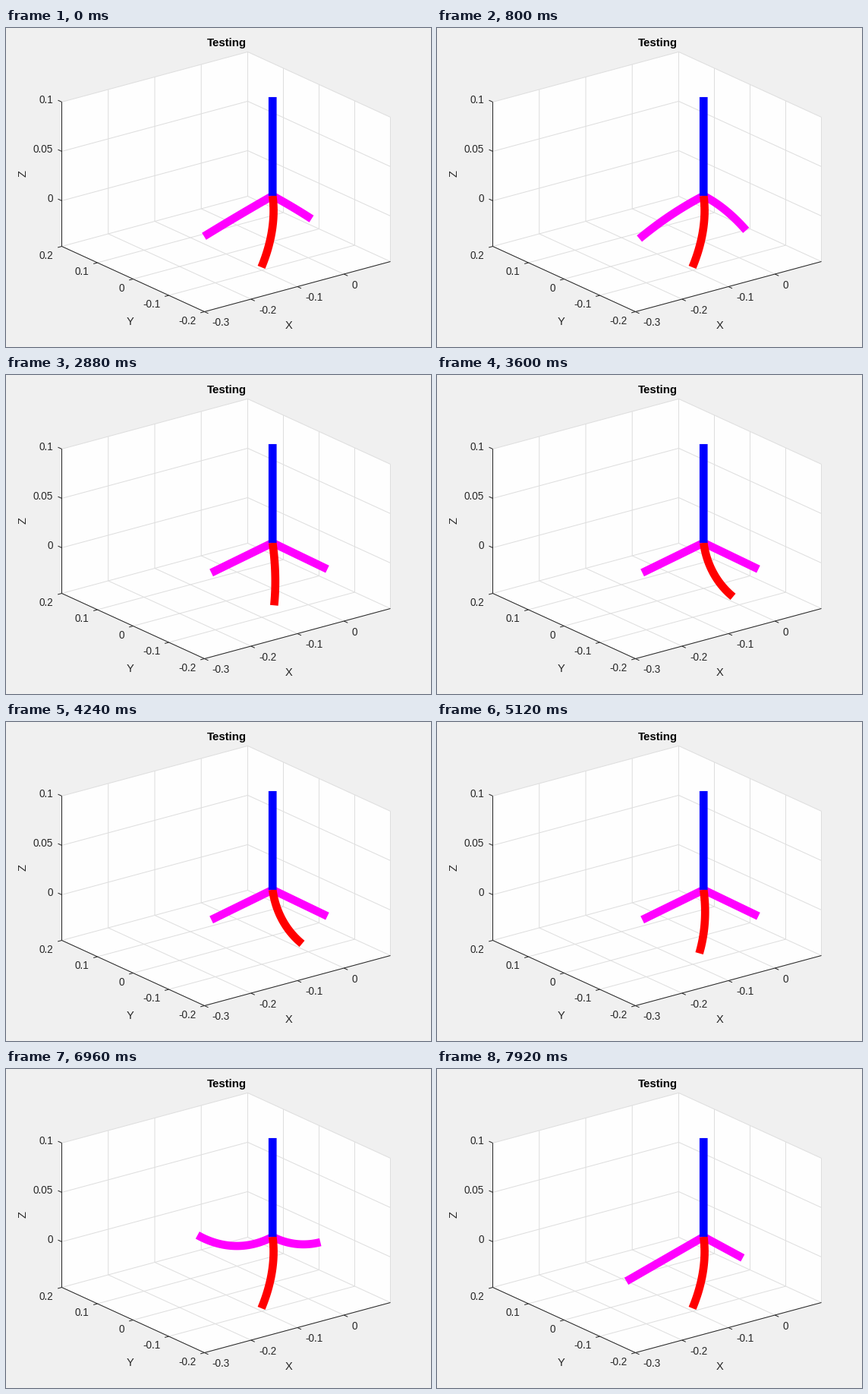
Recreate the animation shown at these times as a matplotlib script. Size 560 by 420 pixels, loop 8000 ms.

```python
import numpy as np
import matplotlib.pyplot as plt
from matplotlib.animation import FuncAnimation

W, H, DPI = 560, 420, 100
PT = 72 / DPI                      # points per pixel
FRAMES, STEP_MS = 100, 80
HALF = 20                          # steps in a stroke, and in a recovery
ARM_START, LOWER_START = 79, 29
INK, GRID = "#262626", "#dedede"
LIMB_PX, LIMB_LEN = 10.67, 0.125

plt.rcParams["font.family"] = "Liberation Sans"
fig = plt.figure(figsize=(W / DPI, H / DPI), dpi=DPI, facecolor="#f0f0f0")
ax = fig.add_axes([0, 0, 1, 1])
ax.set(xlim=(-0.5, W - 0.5), ylim=(H - 0.5, -0.5))
ax.axis("off")

# Orthographic box
X0, X1, Y0, Y1, Z0, Z1 = -0.3, 0.1, -0.2, 0.2, -0.0462, 0.1
XS = np.linspace(X0, X1, 5)
YS = np.linspace(Y0, Y1, 5)
ZS = [0, 0.05, 0.1]


def project(x, y, z):
    px = 261 + 612.5 * (x - X0) - 470 * (y - Y0)
    py = 373 - 165 * (x - X0) - 215 * (y - Y0) - 1300 * (z - Z0)
    return np.array([px, py])


def line(points, color, width=1.0, **kw):
    x, y = np.transpose(points)
    return ax.plot(x, y, color=color, lw=width * PT,
                   solid_capstyle="butt", **kw)[0]


def edge(*points, color=GRID):
    line([project(*p) for p in points], color)


def text(x, y, s, size=13.5, **kw):
    kw = {"color": INK, "va": "baseline", **kw}
    ax.text(x - 0.8, y - 0.8, s, fontsize=size * PT, **kw)


def tick(p, direction):
    d = np.array(direction) / np.hypot(*direction)
    line([p, p + 5.5 * d], INK)


def draw_axes():
    outline = [(X0, Y1, Z1), (X1, Y1, Z1), (X1, Y0, Z1),
               (X1, Y0, Z0), (X0, Y0, Z0), (X0, Y1, Z0)]
    ax.fill(*np.transpose([project(*p) for p in outline]),
            color="#fefefe", lw=0)

    for x in XS:
        edge((x, Y0, Z0), (x, Y1, Z0), (x, Y1, Z1))
    for y in YS:
        edge((X0, y, Z0), (X1, y, Z0), (X1, y, Z1))
    for z in ZS:
        edge((X0, Y1, z), (X1, Y1, z), (X1, Y0, z))
    edge((X0, Y1, Z1), (X0, Y1, Z0), (X0, Y0, Z0), (X1, Y0, Z0), color=INK)

    for x in XS[:4]:
        p = project(x, Y0, Z0)
        tick(p, (47, 21.5))
        text(p[0] + 11, p[1] + 19.5, f"{round(x, 1) + 0:g}")
    for y in YS:
        p = project(X0, y, Z0)
        tick(p, (-61, 16.5))
        text(p[0] - 10.5, p[1] + 17, f"{round(y, 1) + 0:g}", ha="right")
    for z in ZS:
        p = project(X0, Y1, z)
        tick(p, (-47, -21.5))
        text(p[0] - 10.5, p[1] + 2.5, f"{z:g}", ha="right")

    text(373, 396, "X", 14.67, ha="center")
    text(164, 391, "Y", 14.67, ha="center")
    text(22.5, 192, "Z", 14.67, ha="center", va="center", rotation=90)
    text(291, 24, "Testing", 15, ha="center", color="black", weight="bold")


S = np.linspace(0, 1, 40)


def limb(azimuth, length, side, lift):
    """Arc of constant curvature; side and lift are its bend in radians."""
    a = np.radians(azimuth)
    c, s = np.cos(a), np.sin(a)
    cos_t, sin_t = np.sqrt(8) / 3, 1 / 3       # tetrahedral slope
    along = np.array([c * cos_t, s * cos_t, -sin_t])
    across = np.array([-s, c, 0])
    up = np.array([c * sin_t, s * sin_t, cos_t])

    bend = max(np.hypot(side, lift), 1e-6)
    normal = (side * across + lift * up) / bend
    arc = length / bend * (np.outer(np.sin(bend * S), along)
                           + np.outer(1 - np.cos(bend * S), normal))
    return project(*arc.T).T


def arm(k, azimuth, swing, raise_, drop, stretch, power):
    """Raised, stretched stroke outwards, then a low recovery."""
    wave = np.sin(np.pi * k / HALF)
    if k <= HALF:
        out = np.sin(np.pi / 2 * k / HALF)
        return limb(azimuth + swing * out, LIMB_LEN * (1 + stretch * out),
                    0, raise_ * wave)
    out = 1 - ((k - HALF) / HALF) ** power
    return limb(azimuth + swing * out, LIMB_LEN, 0, drop * wave)


def lower_limb(k):
    side = 0.08 - 0.63 * np.cos(np.pi * k / HALF)
    arch = abs(np.sin(np.pi / 2 * k / HALF))
    return limb(240, LIMB_LEN, side, 0.3 * np.sqrt(arch) - 0.17)


def cycle_step(frame, start):
    return min((frame - start) % FRAMES, 2 * HALF)


draw_axes()
joint = project(0, 0, 0)
arms = line([joint, joint], "#ff00ff", LIMB_PX, solid_joinstyle="miter")
lower = line([joint, joint], "#ff0000", LIMB_PX)
line([joint, project(0, 0, Z1)], "#0000ff", LIMB_PX, snap=False)


def update(frame):
    k = cycle_step(frame, ARM_START)
    left = arm(k, 115, 24, raise_=0.64, drop=0.15, stretch=0.12, power=1)
    right = arm(k, 0, 18, raise_=0.30, drop=0.20, stretch=0, power=2)
    arms.set_data(*np.vstack([left[::-1], right[1:]]).T)
    lower.set_data(*lower_limb(cycle_step(frame, LOWER_START)).T)
    return arms, lower


anim = FuncAnimation(fig, update, frames=FRAMES, interval=STEP_MS,
                     repeat=True, repeat_delay=0, blit=False)
plt.show()
```
